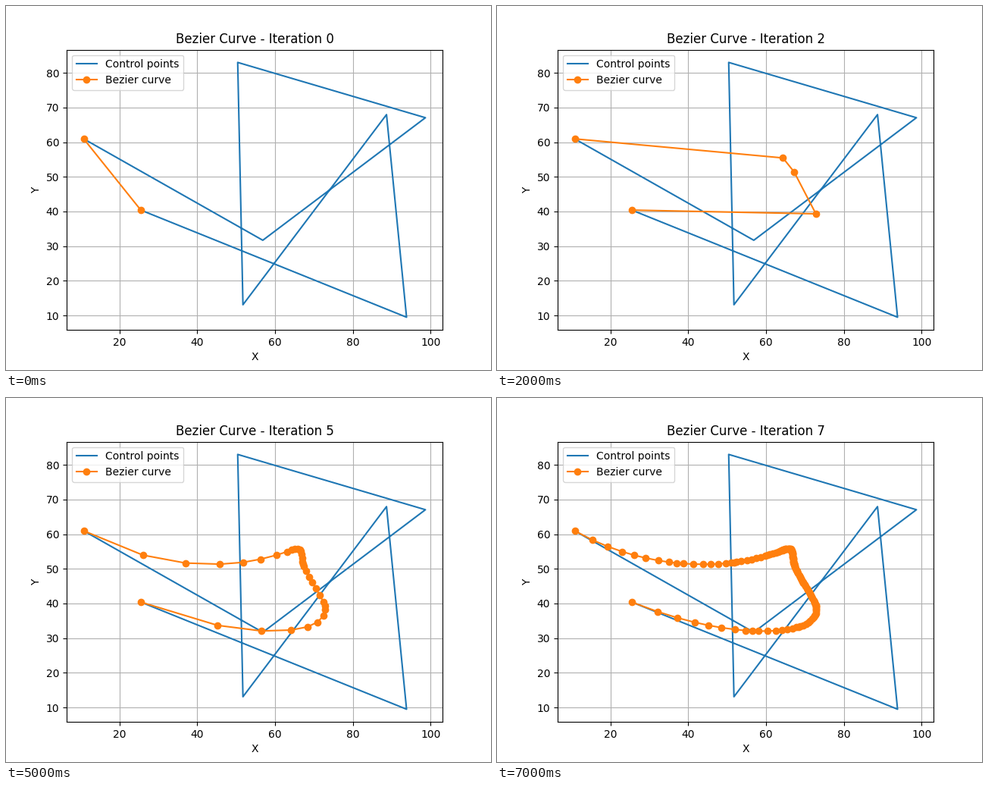
These frames come from a looping animation (640 px wide and 480 px high, 8000 ms). A matplotlib script:

```python
import numpy as np
import matplotlib.pyplot as plt
from matplotlib.animation import FuncAnimation

STEPS = 8
CONTROL = np.array([
    (10.82, 60.95), (56.85, 31.7), (98.65, 67.05), (50.4, 83.0),
    (51.75, 13.1), (88.65, 67.95), (93.8, 9.5), (25.5, 40.4),
])


def split(points):
    """Halve a control polygon; both halves carry the midpoint twice."""
    left, right = [points[0]], [points[-1]]
    while len(points) > 1:
        points = (points[:-1] + points[1:]) / 2
        left.append(points[0])
        right.append(points[-1])
    mid = points[0]
    return np.array(left + [mid]), np.array([mid] + right[::-1])


def curve(depth):
    """End points of all pieces after halving the polygon depth times."""
    pieces = [CONTROL]
    for _ in range(depth):
        pieces = [half for piece in pieces for half in split(piece)]
    return np.array([piece[0] for piece in pieces] + [CONTROL[-1]])


fig, ax = plt.subplots(figsize=(6.4, 4.8), dpi=100)
ax.plot(*CONTROL.T, color="#1f77b4", label="Control points")
bezier, = ax.plot(*curve(0).T, "o-", color="#ff7f0e", label="Bezier curve")
title = ax.set_title("Bezier Curve - Iteration 0")
ax.set_xlabel("X")
ax.set_ylabel("Y")
ax.grid(True)
ax.legend(loc="upper left")


def update(step):
    bezier.set_data(*curve(step).T)
    title.set_text(f"Bezier Curve - Iteration {step}")
    return bezier, title


anim = FuncAnimation(fig, update, frames=STEPS, interval=1000, repeat=True)
plt.show()
```
